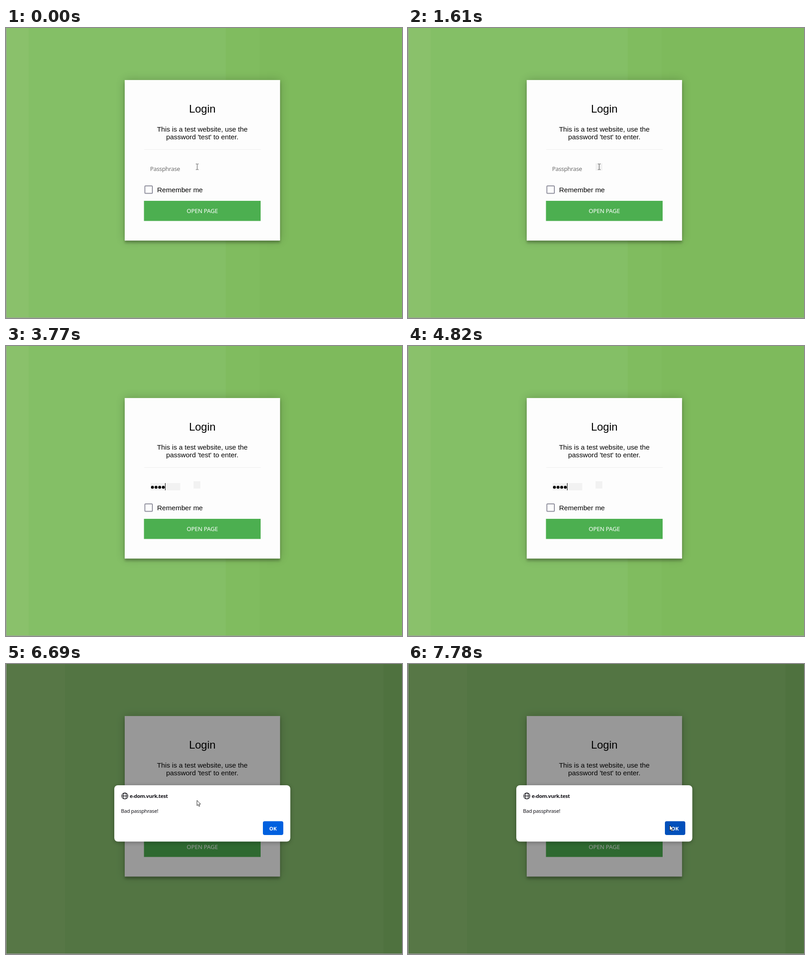
An HTML page with a canvas for the animation above (8 s loop, 874 by 641 pixels).

```html
<!DOCTYPE html>
<html lang="en">
<head>
<meta charset="utf-8">
<title>Login form</title>
<style>
  html, body { margin: 0; width: 100%; height: 100%; overflow: hidden; background: #7eba5c; }
  canvas { display: block; width: 874px; height: 641px; }
</style>
</head>
<body>
<canvas id="stage" width="874" height="641"></canvas>
<script>
const ctx = document.getElementById('stage').getContext('2d');
const W = 874, H = 641, LOOP = 8000, MID = 433.25;
const ARIAL = '"Liberation Sans", Arial, sans-serif';
const UI = '"Noto Sans", "Open Sans", sans-serif';
const INK = '#15141a', FIELD = '#f2f2f2';

const LIGHT = [[0, '#8ac16b'], [50, '#84bf66'], [485, '#80bc5f'], [560, '#7eba5c']];
const DIM = [[0, '#91c575'], [130, '#8ac370'], [833, '#84be69']];

function rect(x, y, w, h, color) {
  ctx.fillStyle = color;
  ctx.fillRect(x, y, w, h);
}

function rounded(x, y, w, h, r, color) {
  ctx.beginPath();
  ctx.roundRect(x, y, w, h, r);
  ctx.fillStyle = color;
  ctx.fill();
}

function text(str, x, y, font, color, align = 'left', spacing = 0) {
  ctx.font = font;
  ctx.fillStyle = color;
  ctx.textAlign = align;
  ctx.letterSpacing = spacing + 'px';
  ctx.fillText(str, x, y);
}

function withShadow(blur, dy, alpha, draw) {
  ctx.save();
  ctx.shadowColor = `rgba(0,0,0,${alpha})`;
  ctx.shadowBlur = blur;
  ctx.shadowOffsetY = dy;
  draw();
  ctx.restore();
}

function background(bands) {
  for (const [x, color] of bands) rect(x, 0, W - x, H, color);
}

function card() {
  const body = () => rect(262, 115, 342.5, 354.5, '#fdfdfd');
  withShadow(19, 0, 0.2, body);
  withShadow(5, 5, 0.24, body);
  body();
  text('Login', MID, 187, '24px ' + ARIAL, '#000', 'center');
  const font = '15.25px ' + ARIAL;
  text('This is a test website, use the', MID, 229, font, '#000', 'center');
  text("password 'test' to enter.", MID, 246, font, '#000', 'center');
  rect(305, 268, 257, 1, '#eeeeee');

  ctx.beginPath();
  ctx.roundRect(306.5, 349, 16.5, 16.5, 1.5);
  ctx.strokeStyle = '#8f8f9d';
  ctx.lineWidth = 2;
  ctx.stroke();
  text('Remember me', 333.5, 363, font, '#000');

  rect(304.5, 382, 257.5, 44.5, '#4caf50');
  text('OPEN PAGE', MID, 409, '13px ' + UI, '#fff', 'center', -0.15);
}

function beam() {
  ctx.strokeStyle = '#444';
  ctx.lineWidth = 1;
  ctx.beginPath();
  ctx.moveTo(419, 300.5); ctx.lineTo(421.5, 300.5);
  ctx.moveTo(422.5, 300.5); ctx.lineTo(425, 300.5);
  ctx.moveTo(422, 301); ctx.lineTo(422, 313);
  ctx.moveTo(419, 313); ctx.lineTo(421.5, 313);
  ctx.moveTo(422.5, 313); ctx.lineTo(425, 313);
  ctx.stroke();
}

function clickRing() {
  ctx.beginPath();
  ctx.arc(421.5, 307, 7.8, 0, Math.PI * 2);
  ctx.fillStyle = FIELD;
  ctx.fill();
  ctx.strokeStyle = '#444';
  ctx.lineWidth = 1;
  ctx.stroke();
}

const KEYS = [2790, 3110, 3410, 3770];
const CARET = [[1130, 1610], [2180, 2670], [2790, 4270], [4820, 5140]];

function field(t) {
  const typed = KEYS.filter(k => t >= k).length;
  if (t >= 1250) rect(414, 299, 15, 16, FIELD);
  else if (t >= 1070) clickRing();
  if (t < 2850) beam();

  if (typed) rect(319, 303, 65.5, 16, FIELD);
  else text('Passphrase', 318, 316, '13px ' + UI, '#6e6e6e', 'left', -0.35);

  ctx.fillStyle = '#000';
  for (let i = 0; i < typed; i++) {
    ctx.beginPath();
    ctx.arc(323.2 + i * 8, 312.3, 3.2, 0, Math.PI * 2);
    ctx.fill();
  }
  if (CARET.some(([a, b]) => t >= a && t < b)) rect(319 + typed * 8, 303, 1, 16, '#000');
}

function globe(x, y) {
  ctx.strokeStyle = INK;
  ctx.lineWidth = 1.3;
  ctx.beginPath();
  ctx.arc(x, y, 6.7, 0, Math.PI * 2);
  ctx.moveTo(x + 3.1, y);
  ctx.ellipse(x, y, 3.1, 6.7, 0, 0, Math.PI * 2);
  ctx.moveTo(x - 6.7, y);
  ctx.lineTo(x + 6.7, y);
  ctx.stroke();
}

function dialog(hover) {
  withShadow(10, 2, 0.3, () => rounded(239, 268, 388.5, 124.5, 8, '#fff'));
  globe(262.3, 291.7);
  text('e-dom.vurk.test', 273, 296, '600 11.3px ' + UI, INK, 'left', -0.4);
  text('Bad passphrase!', 253.7, 329, '11.3px ' + UI, INK, 'left', -0.33);
  rounded(567, 347.5, 45, 30.5, 4, hover ? '#0250bb' : '#0060df');
  text('OK', 589.3, 367.5, '600 11.3px ' + UI, '#fff', 'center');
}

// Pointer tip, moving in 60 ms steps along a slightly bowed path
function pointerAt(t) {
  if (t < 6690) return null;
  if (t < 6750) return [421, 301];
  if (t < 6940) return [421, 295];
  if (t >= 7780) return [577, 356];
  const p = Math.floor((t - 6940) / 60) / 13;
  const u = p * p * (3 - 2 * p);
  return [421 + 152 * u, 289 + 66 * Math.pow(u, 1.2)];
}

function arrow(x, y) {
  ctx.save();
  ctx.translate(Math.round(x) + 0.5, Math.round(y) + 0.5);
  ctx.beginPath();
  [[0, 0], [0, 11.5], [2.6, 9.2], [4.4, 13.3], [6.2, 12.5], [4.5, 8.5], [8, 8.2]]
    .forEach(([px, py]) => ctx.lineTo(px, py));
  ctx.closePath();
  ctx.fillStyle = '#fff';
  ctx.fill();
  ctx.strokeStyle = '#111';
  ctx.lineWidth = 0.9;
  ctx.stroke();
  ctx.restore();
}

function draw(t) {
  const alert = t >= 5140;
  background(alert ? DIM : LIGHT);
  card();
  if (alert) {
    rect(0, 0, W, H, 'rgba(0,0,0,0.4)');
    const tip = pointerAt(t);
    dialog(tip && tip[0] >= 567 && tip[1] >= 347);
    if (tip) arrow(...tip);
  } else {
    field(t);
  }
  rect(0, 0, 1, H, '#a0a0a0');
  rect(0, H - 1, W, 1, '#a0a0a0');
}

const start = performance.now();
function tick() {
  draw((performance.now() - start) % LOOP);
  requestAnimationFrame(tick);
}
tick();
</script>
</body>
</html>
```
